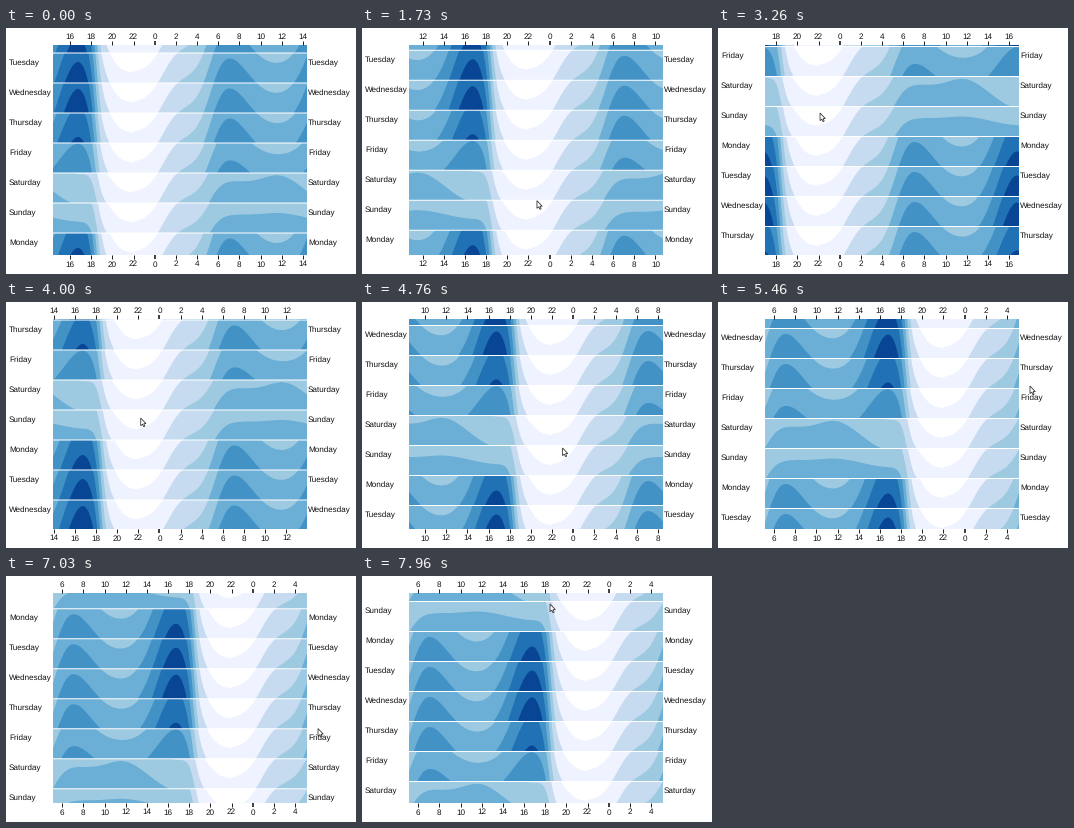
Recreate the animation shown at these times as a matplotlib script. Size 350 px wide and 246 px high, loop 8000 ms.

```python
import numpy as np
import matplotlib.pyplot as plt
from matplotlib.animation import FuncAnimation
from matplotlib.colors import to_rgb
from matplotlib.patches import Polygon, Rectangle

W, H, DPI = 350, 246, 100
PX = 72 / DPI
FRAMES, STEP = 250, 32
LEFT, TOP, WIDTH, ROW = 47, 17, 254, 30
HEIGHT = 7 * ROW
HOUR = WIDTH / 24
SS = 4  # supersampling of the chart

BLUES = ["#ffffff", "#eff3ff", "#c6dbef", "#9ecae1", "#6baed6", "#4292c6",
         "#2171b5", "#084594"]

# strength of the morning, midday and evening swell of each day
DAYS = {"Monday": (1.3, 0, 2.95), "Tuesday": (1.3, 0, 3.15),
        "Wednesday": (1.3, 0, 3.25), "Thursday": (1.3, 0, 2.65),
        "Friday": (.9, 0, 1.42), "Saturday": (.18, .36, -.6),
        "Sunday": (.06, .1, -.18)}


def step(h, centre, width):
    return 1 / (1 + np.exp((centre - h) / width))


def bump(h, centre, before, after):
    return np.exp(-((h - centre) / np.where(h < centre, before, after)) ** 2)


def level(hours, morning, midday, evening):
    """Bands filled at each hour: night floor, two rises, swells, a steep fall."""
    h = (hours + 2) % 24 - 2
    day = (1.9 * step(h, .75, .75) + 1.33 * step(h, 5.05, .6)
           + morning * bump(h, 6.9, 2, 2.6)
           + midday * bump(h, 11.7, 2.2, 2.2)
           + evening * bump(h, 16.8, 2.6, 2.5))
    fall = .75 * step(-h, -18.5, .3) + .25 * step(-h, -20, .5)
    return .32 + day * fall


def build_week():
    """The whole week, Monday 0h at the top left, as RGB."""
    hours = (np.arange(WIDTH * SS) + .5) / (HOUR * SS)
    up = 1 - (np.arange(ROW * SS) + .5) / (ROW * SS)
    palette = np.array([to_rgb(c) for c in BLUES], np.float32)
    rows = []
    for swells in DAYS.values():
        band = np.ceil(level(hours, *swells) - up[:, None]).astype(int)
        rgb = palette[np.clip(band, 0, 7)]
        rgb[:SS] = 1
        rows.append(rgb)
    return np.concatenate(rows)


WEEK = build_week()


def chart(x0, y0):
    """Week rolled so that Monday 0h lies at x0, y0; scaled to pixels."""
    shift = (round((y0 - TOP) * SS), round((x0 - LEFT) * SS))
    big = np.roll(WEEK, shift, axis=(0, 1))
    rows = sum(big[i::SS] for i in range(SS))
    return sum(rows[:, i::SS] for i in range(SS)) / SS ** 2


# time, x, y: the 16h tick with the top of Tuesday, and the pointer tip
SCROLL = [(900, 64, 24.5), (1730, 102, 22), (2430, 146, -36.5),
          (3260, 37, -72), (4760, 127, -7), (5000, 150, -4), (5130, 150, -4),
          (5460, 162, -4), (5760, 162, -4), (6400, 162, 15.5), (7500, 162, 85)]
POINTER = [(300, 190, 202), (530, 134, 179), (900, 134, 179),
           (1730, 174, 173), (2430, 215, 99), (3260, 102, 85),
           (4760, 201, 146), (5460, 312, 84), (5760, 312, 84),
           (6400, 312, 103), (7430, 312, 172), (7960, 188, 28)]


def smooth(t, xs, ys):
    """Monotone cubic curve through the points."""
    gap = np.diff(xs)
    rise = np.diff(ys) / gap
    slope = np.zeros(len(xs))
    for j, (a, b) in enumerate(zip(rise, rise[1:]), 1):
        slope[j] = 2 * a * b / (a + b) if a * b > 0 else 0
    t = min(max(t, xs[0]), xs[-1])
    i = min(np.searchsorted(xs, t, side="right"), len(gap)) - 1
    s = (t - xs[i]) / gap[i]
    ease = s * s * (3 - 2 * s)
    return (ys[i] + (ys[i + 1] - ys[i]) * ease
            + gap[i] * s * (1 - s) * (slope[i] * (1 - s) - slope[i + 1] * s))


def position(t, path):
    times, xs, ys = np.array(path, float).T
    return smooth(t, times, xs), smooth(t, times, ys)


plt.rcParams["text.hinting"] = "no_hinting"
fig = plt.figure(figsize=(W / DPI, H / DPI), dpi=DPI, facecolor="white")
ax = fig.add_axes([0, 0, 1, 1])
ax.axis("off")
picture = ax.imshow(chart(LEFT, TOP), aspect="auto", interpolation="nearest",
                    extent=(LEFT, LEFT + WIDTH, TOP + HEIGHT, TOP))
ax.set_xlim(0, W)
ax.set_ylim(H, 0)

FONT = dict(family="Liberation Sans", fontsize=8.2 * PX, color="#111111",
            va="baseline")
window = Rectangle((0, TOP - 1), W, HEIGHT + 2, transform=ax.transData)

ticks = []
for h in range(0, 24, 2):
    width = (1.7 if h == 0 else 1) * PX
    marks = [ax.plot([0, 0], [y, y + 4], color="#222222", lw=width,
                     solid_capstyle="butt")[0]
             for y in (TOP - 4, TOP + HEIGHT)]
    names = [ax.text(0, y, str(h), ha="center", **FONT) for y in (11, 238.5)]
    ticks.append((h, marks, names))

labels = []
for d, name in enumerate(DAYS):
    for x in (3, 302):
        for wrap in (0, -HEIGHT):
            text = ax.text(x, 0, name, ha="left", clip_on=True, **FONT)
            text.set_clip_path(window)
            labels.append((d, wrap, text))

ARROW = .9 * np.array([(0, 0), (0, 8.5), (2, 6.8), (3.3, 9.6), (4.6, 9),
                       (3.4, 6.2), (5.9, 6.2)])
pointer = Polygon(ARROW, closed=True, fc="white", ec="#333333", lw=.8 * PX,
                  zorder=5)
ax.add_patch(pointer)


def draw(i):
    now = (i + .6) * STEP
    x16, tuesday = position(now, SCROLL)
    monday = tuesday - ROW
    picture.set_data(chart(x16 - 16 * HOUR, monday))

    for h, marks, names in ticks:
        x = LEFT + (x16 + (h - 16) * HOUR - LEFT) % WIDTH
        for mark in marks:
            mark.set_xdata([x, x])
        for name in names:
            name.set_x(x)

    for d, wrap, text in labels:
        y = (monday + d * ROW + 12.5 - TOP) % HEIGHT + TOP + wrap
        text.set_y(y)
        text.set_visible(y > TOP - 3)

    pointer.set_visible(now >= 300)
    pointer.set_xy(ARROW + position(now, POINTER))
    return []


anim = FuncAnimation(fig, draw, frames=FRAMES, interval=STEP, repeat=True,
                     repeat_delay=0, blit=False)
plt.show()
```
